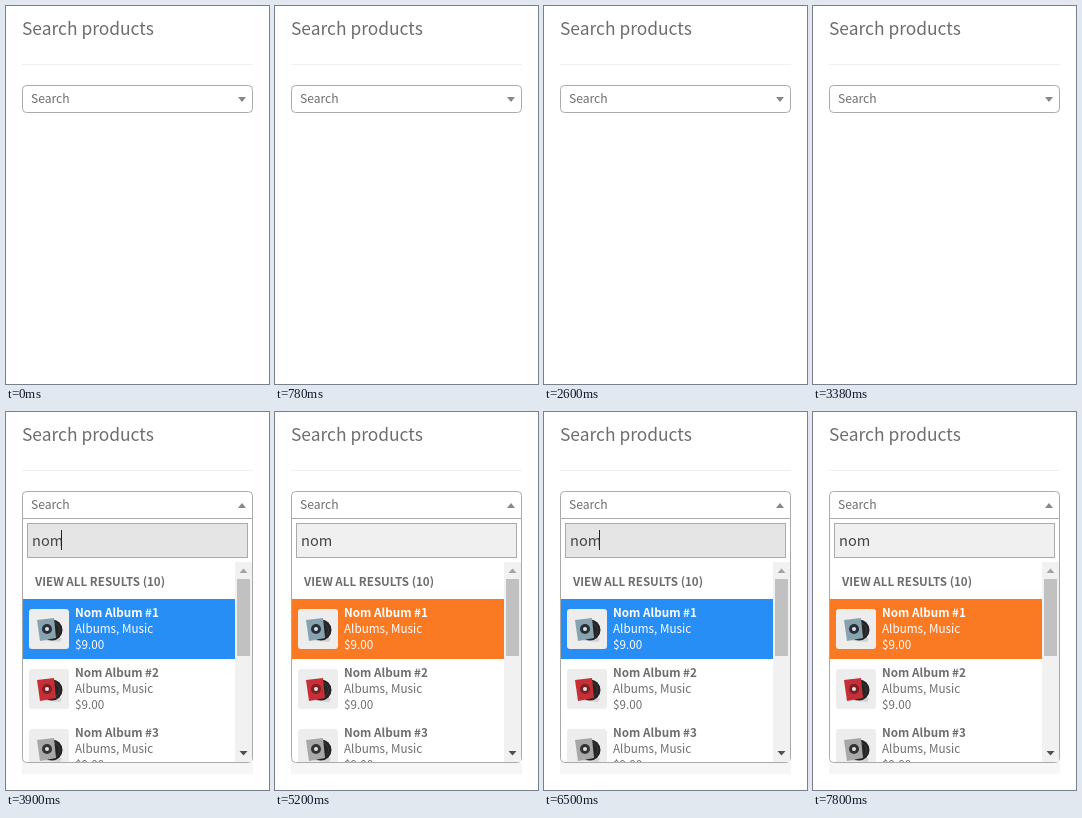
Write an HTML page that moves like this. It is 263 by 378 pixels and loops after 8 s.

```html
<!DOCTYPE html>
<html lang="en">
<head>
<meta charset="utf-8">
<title>Product search</title>
<style>
html, body { margin: 0; width: 100%; height: 100%; overflow: hidden; background: #fff; }
svg { display: block; width: 263px; height: 378px; }
text { font-family: "Noto Sans CJK JP", "Noto Sans CJK SC", "Noto Sans CJK", "Open Sans", sans-serif; fill: #6d6d6d; white-space: pre; }
.light { font-weight: 300; }
.bold { font-weight: 600; }
</style>
</head>
<body>
<svg viewBox="0 0 263 378">
  <defs>
    <clipPath id="list"><rect x="17" y="150" width="212" height="200"/></clipPath>
  </defs>
  <text class="light" x="16" y="29" font-size="17.4">Search products</text>
  <path d="M16 58.5H247" stroke="#f0f0f0"/>
  <path id="box" fill="#fff" stroke="#aaa"/>
  <text id="label" class="light" x="25" y="97" font-size="12.1">Search</text>
  <path id="arrow" fill="#888"/>
  <g id="panel">
    <rect x="16" y="351" width="231" height="11" fill="#f6f6f6"/>
    <path d="M16.5 106.5H246.5V346.5a4 4 0 0 1-4 4H20.5a4 4 0 0 1-4-4Z" fill="#fff" stroke="#aaa"/>
    <rect id="field" x="21.5" y="111.5" width="220" height="34" stroke="#aaa"/>
    <text x="26" y="134" font-size="14.6" style="fill:#43454b">nom</text>
    <path id="caret" d="M55.5 118V138" stroke="#222"/>
    <text class="bold" x="29" y="174" font-size="11.6">VIEW ALL RESULTS (10)</text>
    <g id="rows" clip-path="url(#list)"></g>
    <rect x="229" y="150" width="17" height="200" fill="#f1f1f1"/>
    <rect x="231" y="167" width="13" height="77" fill="#c1c1c1"/>
    <path d="M233.5 161H241.5L237.5 156.5Z" fill="#a3a3a3"/>
    <path d="M233.5 339H241.5L237.5 343.5Z" fill="#505050"/>
  </g>
</svg>
<script>
const $ = id => document.getElementById(id);
const STEP = 1300, LOOP = 8000;
const BLUE = '#268ef4', ORANGE = '#f97a22';
const sleeves = [['#88a3b0', '#263038'], ['#c52f35', '#7c1f26'], ['#a6a8aa', '#333']];

function row([cover, mark], i) {
  const y = 187 + 60 * i;
  const tone = i ? '' : ' style="fill:#fff"';
  const line = (n, text, cls = '') =>
    `<text class="${cls}" x="69" y="${18 + 16 * n}" font-size="11.7"${tone}>${text}</text>`;
  return `<g transform="translate(0 ${y})">
    ${i ? '' : '<rect id="active" x="17" width="212" height="60"/>'}
    <g transform="translate(23 10)">
      <rect width="40" height="40" rx="3" fill="#ededed"/>
      <path d="M9 31L31 33L33 30L30 28Z" fill="#d2d2d2"/>
      <circle cx="23" cy="21" r="10.5" fill="#242424"/>
      <circle cx="23" cy="21" r="7.5" fill="none" stroke="#444" stroke-width=".7"/>
      <path d="M8 11L25 9L27 29L11 32Z" fill="${cover}"/>
      <circle cx="18" cy="20" r="5" fill="${mark}"/>
      <circle cx="18" cy="20" r="2" fill="#e2e2e2"/>
    </g>
    ${line(0, `Nom Album #${i + 1}`, 'bold')}${line(1, 'Albums, Music')}${line(2, '$9.00')}
  </g>`;
}
$('rows').innerHTML = sleeves.map(row).join('');

function draw(ms) {
  const step = Math.floor(ms / STEP);
  const open = step > 2;
  const blue = step % 2 === 1;
  $('panel').style.display = open ? '' : 'none';
  $('box').setAttribute('d', open
    ? 'M16.5 106.5V83.5a4 4 0 0 1 4-4H242.5a4 4 0 0 1 4 4V106.5Z'
    : 'M20.5 79.5H242.5a4 4 0 0 1 4 4V102.5a4 4 0 0 1-4 4H20.5a4 4 0 0 1-4-4V83.5a4 4 0 0 1 4-4Z');
  $('arrow').setAttribute('d', open ? 'M232 96H240L236 91Z' : 'M232 91H240L236 96Z');
  $('label').style.fill = step === 1 ? '#f0323c' : '#6d6d6d';
  $('active').setAttribute('fill', blue ? BLUE : ORANGE);
  $('field').setAttribute('fill', blue ? '#e5e5e5' : '#f0f0f0');
  $('caret').style.display = blue ? '' : 'none';
}

const start = performance.now();
function tick() {
  draw((performance.now() - start) % LOOP);
  requestAnimationFrame(tick);
}
draw(0);
requestAnimationFrame(tick);
</script>
</body>
</html>
```
